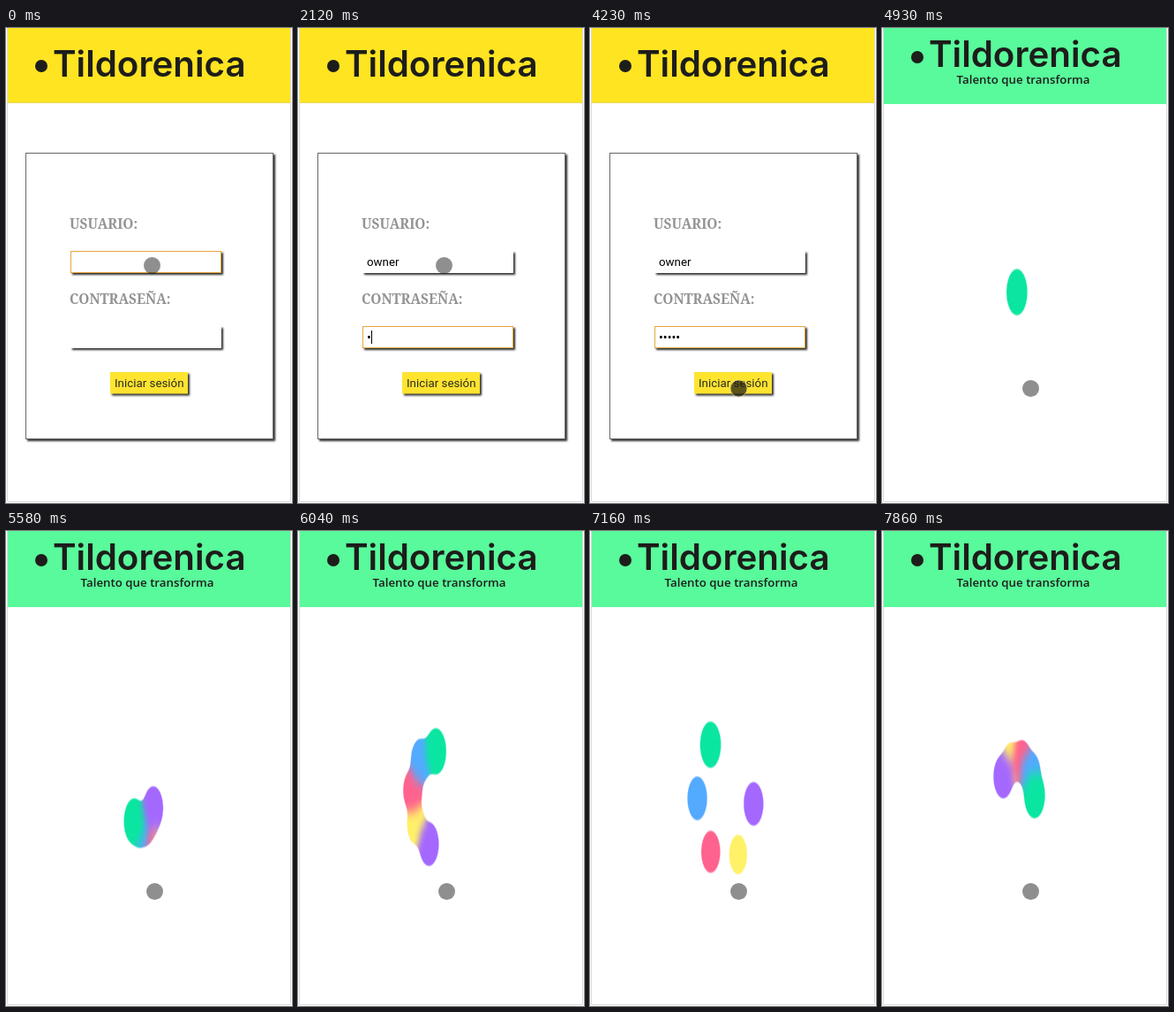
An HTML page that plays this animation: 324 px wide and 537 px high, repeating every 8000 ms.

```html
<!DOCTYPE html>
<html lang="es">
<head>
<meta charset="utf-8">
<title>Iniciar sesión</title>
<style>
  html, body { margin: 0; width: 100%; height: 100%; overflow: hidden; background: #fff; }
  svg { display: block; width: 324px; height: 537px; }
  .edge { fill: none; stroke: #dadada; }
  .brand { font: 600 40.3px Inter, sans-serif; fill: #1d1d1b; }
  .slogan { font: 600 13.3px "Open Sans", sans-serif; fill: #1d1d1b; }
  .label { font: 700 15.4px "Noto Serif", serif; fill: #939393; }
  .ui { font: 13.33px Roboto, sans-serif; fill: #000; white-space: pre; }
  .secret { font-size: 14.3px; }
  .raised { filter: drop-shadow(2px 2px .8px #2c2c2c); }
  .field { fill: #fff; stroke: #fff; }
  .field.focus { stroke: #e6a53c; }
</style>
</head>
<body>
<svg viewBox="0 0 324 537">
  <defs>
    <filter id="goo" filterUnits="userSpaceOnUse" x="-60" y="-60" width="120" height="120"
            color-interpolation-filters="sRGB">
      <feGaussianBlur stdDeviation="3"/>
      <feColorMatrix values="1 0 0 0 0  0 1 0 0 0  0 0 1 0 0  0 0 0 7 -2.7"/>
    </filter>
  </defs>

  <path class="edge" d="M1.5 0V535.5H322.5V0"/>

  <g id="login">
    <rect x="2" width="320" height="84" fill="#ffe422"/>
    <rect x="2" y="84" width="320" height="1" fill="#ead65a"/>
    <circle cx="40" cy="43" r="7" fill="#1d1d1b"/>
    <text class="brand" x="53" y="54.5">Tildorenica</text>

    <rect class="raised" x="22.5" y="141.5" width="280" height="323" fill="#fff" stroke="#666"/>
    <text class="label" x="72" y="227">USUARIO:</text>
    <text class="label" x="72" y="312">CONTRASEÑA:</text>
    <g class="raised"><rect id="userBox" class="field" x="73.5" y="252.5" width="170" height="24"/></g>
    <g class="raised"><rect id="passBox" class="field" x="73.5" y="337.5" width="170" height="24"/></g>
    <text id="user" class="ui" x="78" y="269"></text>
    <text id="pass" class="ui secret" x="78" y="354.5"></text>
    <rect id="caret" width="1" height="15"/>
    <rect class="raised" x="118" y="389" width="88" height="24.5" fill="#ffe42f"/>
    <text class="ui" x="123" y="406" style="fill:#2a2a22">Iniciar sesión</text>
  </g>

  <g id="loading">
    <rect x="2" width="320" height="86" fill="#59fa9b"/>
    <circle cx="40" cy="33" r="7" fill="#1d1d1b"/>
    <text class="brand" x="53" y="43.7">Tildorenica</text>
    <text class="slogan" x="84.5" y="62.6">Talento que transforma</text>
    <g transform="translate(153.5 302) scale(1 2.23)">
      <g id="dots" filter="url(#goo)"></g>
    </g>
  </g>

  <circle id="pointer" r="9.5"/>
</svg>

<script>
const LOOP = 8000, LOAD = 4640;
const SPIN = 4600, TICK = 140, SWELL = 4500;
const USER = 'owner';
const USER_KEYS = [740, 860, 1290, 1570, 1705];
const PASS_KEYS = [2120, 2260, 2390, 2670, 2820];
const PASS_FOCUS = 1840;

// colour, radius, place in the chain (positive leads); later ones lie on top
const DOTS = [
  ['#fff168', 10.2, -0.4],
  ['#ff628e', 10.8, 0.6],
  ['#53aaff', 11.2, 1.6],
  ['#a468ff', 11.2, -1.4],
  ['#0ae6a1', 11.8, 2.6]
];

const $ = id => document.getElementById(id);
const set = (el, attrs) => { for (const k in attrs) el.setAttribute(k, attrs[k]); };
const show = (el, on) => { el.style.display = on ? '' : 'none'; };
const typed = (keys, t) => keys.filter(k => t >= k).length;

const dots = DOTS.map(([fill, r, place]) => {
  const el = document.createElementNS('http://www.w3.org/2000/svg', 'circle');
  set(el, { fill, r });
  $('dots').append(el);
  return { el, place };
});

function drawForm(t) {
  const onPass = t >= PASS_FOCUS;
  $('user').textContent = USER.slice(0, typed(USER_KEYS, t));
  $('pass').textContent = '•'.repeat(typed(PASS_KEYS, t));
  $('userBox').classList.toggle('focus', !onPass);
  $('passBox').classList.toggle('focus', onPass);

  const text = onPass ? $('pass') : $('user');
  const width = text.textContent ? text.getComputedTextLength() : 0;
  set($('caret'), { x: Math.round(78 + width), y: onPass ? 342 : 257 });
  show($('caret'), (t >= 590 && t < 3250) || (t >= 3800 && t < 4230));
}

function drawPointer(t) {
  let x = 165.5, y = 268.5;
  if (t >= 4230) {
    x = 168.5;
    y = 407.5;
  } else if (t >= 3250) {
    const u = Math.min(1, (Math.floor((t - 3250) / 137) + 1) / 5);
    y += 145.5 * u * u * (3 - 2 * u);
  }
  const pressed = t >= 4230 && t < LOAD;
  set($('pointer'), {
    cx: x, cy: y,
    fill: pressed ? 'rgba(30,28,20,.72)' : 'rgba(0,0,0,.44)',
    stroke: pressed ? 'rgba(225,215,150,.75)' : 'none'
  });
}

// The chain turns steadily while its radius and gaps swell and shrink together.
function drawDots(t) {
  const age = Math.floor((t - SPIN) / TICK) * TICK + 40;
  const swell = (1 - Math.cos(age / SWELL * 2 * Math.PI)) / 2;
  const turn = age * 0.253 - 201;
  for (const { el, place } of dots) {
    const a = (turn + place * 61 * swell) * Math.PI / 180;
    set(el, { cx: 33.5 * swell * Math.cos(a), cy: 33.5 * swell * Math.sin(a) });
  }
}

const start = performance.now();
function frame() {
  const t = (performance.now() - start) % LOOP;
  const loading = t >= LOAD;
  show($('login'), !loading);
  show($('loading'), loading);
  if (loading) drawDots(t); else drawForm(t);
  drawPointer(t);
  requestAnimationFrame(frame);
}
frame();
</script>
</body>
</html>
```
